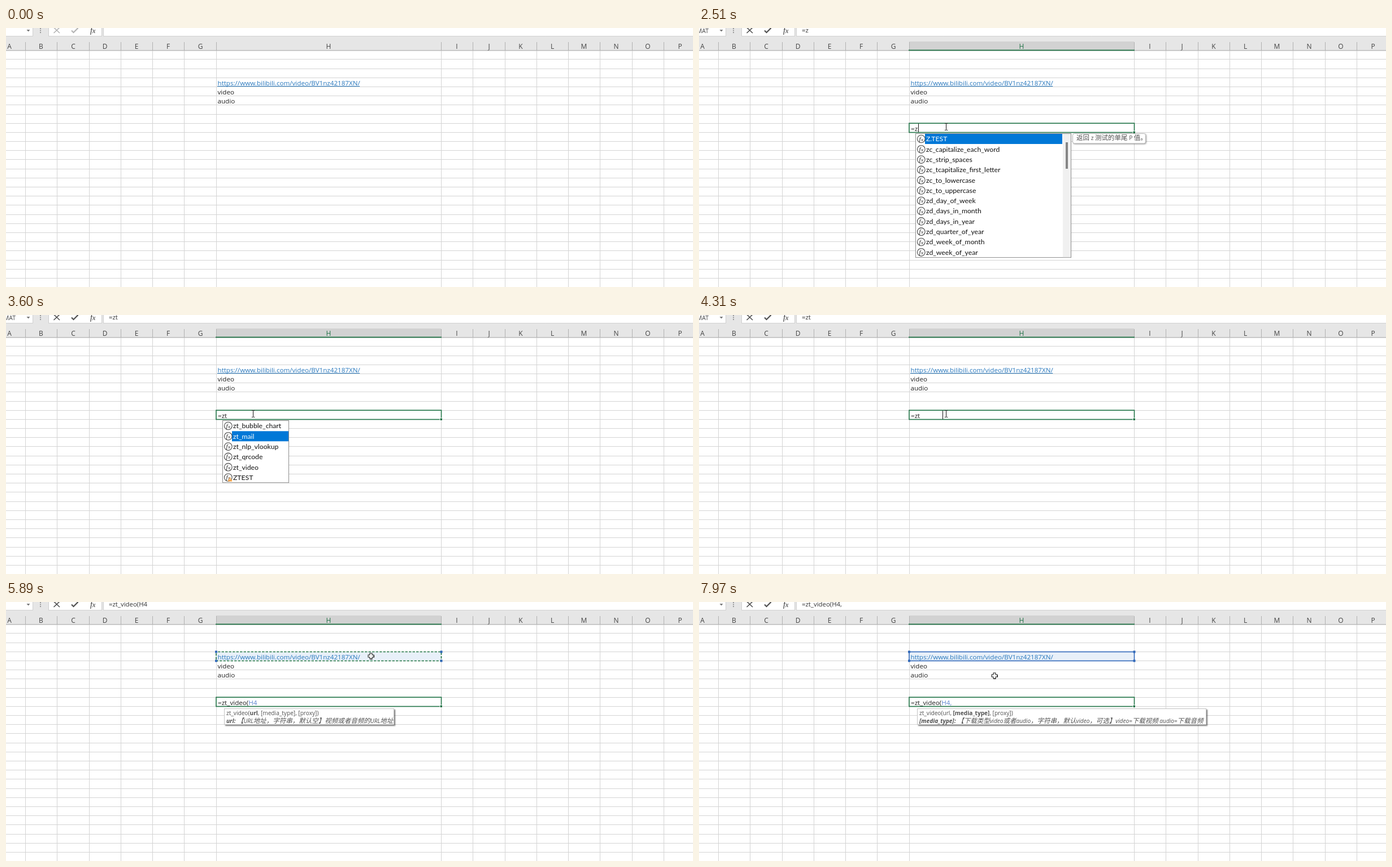
Write an HTML page with a canvas that moves like this. It is 1216 by 460 pixels and loops after 8000 ms.

```html
<!DOCTYPE html>
<html lang="zh">
<head>
<meta charset="utf-8">
<style>
html, body { margin: 0; width: 100%; height: 100%; overflow: hidden; background: #fff; }
canvas { display: block; }
</style>
</head>
<body>
<canvas id="stage" width="1216" height="460"></canvas>
<script>
const ctx = document.getElementById('stage').getContext('2d');
const LOOP = 8000, GREEN = '#217346', BLUE = '#2f67b8';
const SANS = '"Open Sans", "Noto Sans", sans-serif';
const CJK = '"Noto Sans CJK SC", "Noto Sans CJK", sans-serif';
const CELL_FONT = `11.64px ${SANS}`;
const LINK = 'https://www.bilibili.com/video/BV1nz42187XN/';
const LEFT = 372, RIGHT = 770, COLUMN = 56.25;
const rowY = n => Math.round(39.2 + 16.19 * n);

const typed = [[0, ''], [2130, '='], [2380, '=z'], [2740, '=zt'], [4390, '=zt_video('],
  [5650, '=zt_video(H4'], [7040, '=zt_video(H4,']];
const zList = ['Z.TEST', 'zc_capitalize_each_word', 'zc_strip_spaces', 'zc_tcapitalize_first_letter',
  'zc_to_lowercase', 'zc_to_uppercase', 'zd_day_of_week', 'zd_days_in_month', 'zd_days_in_year',
  'zd_quarter_of_year', 'zd_week_of_month', 'zd_week_of_year'];
const ztList = ['zt_bubble_chart', 'zt_mail', 'zt_nlp_vlookup', 'zt_qrcode', 'zt_video', 'ZTEST'];
const ztPick = [[0, 0], [3600, 1], [3680, 2], [3840, 3], [3920, 4]];
const caretShown = [[0, 0], [2130, 1], [3250, 0], [3760, 1], [4900, 0], [5420, 1], [5650, 0],
  [6340, 1], [6880, 0], [7040, 1], [7530, 0]];
const path = [[120, 1097, 454], [830, 445, 179], [1070, 444, 179], [1200, 444, 179], [1290, 436, 175],
  [1420, 437, 175], [4600, 437, 175], [5420, 578, 97], [5580, 646, 96], [7680, 646, 96], [7970, 523, 131]];

const within = (t, a, b) => t >= a && t < b;
const valueAt = (steps, t) => steps.reduce((v, s) => t >= s[0] ? s[1] : v, steps[0][1]);

function pointerAt(t) {
  const i = path.findIndex(p => p[0] > t);
  if (i < 0) return path[path.length - 1].slice(1);
  const [t0, x0, y0] = path[i - 1], [t1, x1, y1] = path[i];
  const u = (t - t0) / (t1 - t0), e = u * u * (3 - 2 * u);
  return [Math.round(x0 + (x1 - x0) * e), Math.round(y0 + (y1 - y0) * e)];
}

function fill(color, x, y, w, h) {
  ctx.fillStyle = color;
  ctx.fillRect(x, y, w, h);
}

function stroke(color, width, ...points) {
  ctx.strokeStyle = color;
  ctx.lineWidth = width;
  ctx.beginPath();
  points.forEach(([x, y]) => ctx.lineTo(x, y));
  ctx.stroke();
}

function outline(color, width, x, y, w, h) {
  ctx.strokeStyle = color;
  ctx.lineWidth = width;
  ctx.strokeRect(x, y, w, h);
}

function text(str, x, y, color, font = CELL_FONT, align = 'left') {
  ctx.font = font;
  ctx.fillStyle = color;
  ctx.textAlign = align;
  ctx.fillText(str, x, y);
  return ctx.measureText(str).width;
}

// Draws [style, string] parts; Latin runs are set slightly smaller than Chinese ones.
function rich(parts, x, y) {
  for (const [style, str] of parts)
    for (const run of str.match(/[\u3000-\uffef]+|[^\u3000-\uffef]+/g)) {
      const font = run[0] >= '\u3000' ? `11.5px ${CJK}` : `10.15px ${SANS}`;
      x += text(run, x, y, '#505050', `${style} ${font}`);
    }
}

function shadowed(blur, offset, draw) {
  ctx.save();
  Object.assign(ctx, { shadowColor: 'rgba(0,0,0,.5)', shadowBlur: blur, shadowOffsetX: offset, shadowOffsetY: offset });
  draw();
  ctx.restore();
}

function drawBar(t, formula) {
  const icon = formula ? '#505050' : '#b4b4b4';
  fill('#e6e6e6', 0, 0, 1216, 40);
  fill('#fff', 0, 0, 47, 14);
  fill('#fff', 76, 0, 94, 14);
  fill('#fff', 173, 0, 1043, 14);
  for (const [a, b] of [[0, 47], [76, 170], [173, 1216]]) stroke('#d0d0d0', 1, [a, 14.5], [b, 14.5]);
  for (const x of [47.5, 75.5, 169.5, 172.5]) stroke('#d0d0d0', 1, [x, 0], [x, 15]);
  ctx.fillStyle = '#777';
  ctx.beginPath();
  ctx.moveTo(36.5, 3); ctx.lineTo(42.5, 3); ctx.lineTo(39.5, 6.5);
  ctx.fill();
  for (const y of [0, 3.5, 7]) fill('#999', 60, y, 2, 2);
  stroke(icon, 1.6, [84.5, -1], [95, 9]);
  stroke(icon, 1.6, [95, -1], [84.5, 9]);
  stroke(icon, 2.2, [116, 4.5], [119.5, 8], [127.5, 0]);
  text('f', 149, 8.5, '#333', 'italic 14px "Liberation Serif", serif');
  text('x', 153, 8.5, '#333', 'italic 12px "Liberation Serif", serif');
  if (within(t, 2380, 5650)) text('MAT', 17, 8.5, '#444', `10.5px ${SANS}`, 'right');
  text(formula, 182, 7.8, '#333', `11.4px ${SANS}`);
}

function drawSheet(active) {
  const columns = [];
  for (let k = 0; k < 7; k++) columns.push(Math.round(34 + COLUMN * k));
  for (let k = 0; k < 8; k++) columns.push(Math.round(RIGHT + COLUMN * k));
  if (active) fill('#d2d2d2', LEFT, 24, RIGHT - LEFT, 16);
  columns.forEach((x, i) => {
    stroke('#b1b1b1', 1, [x + .5, 25], [x + .5, 40]);
    stroke('#d4d4d4', 1, [x + .5, 41], [x + .5, 460]);
    const center = i === 7 ? 571 : x - 28;
    text(String.fromCharCode(65 + i), center, 37.3, active && i === 7 ? GREEN : '#444', `12px ${SANS}`, 'center');
  });
  text('P', 1193, 37.3, '#444', `12px ${SANS}`, 'center');
  for (let n = 1; n < 27; n++) stroke('#d4d4d4', 1, [0, rowY(n) + .5], [1216, rowY(n) + .5]);
  stroke('#9f9f9f', 1, [0, 40], [1216, 40]);
  if (active) fill(GREEN, 371, 38.6, 400, 1.8);
}

function drawReference(t) {
  const chosen = t >= 5650;
  if (chosen) fill('#e8f0f9', LEFT, 88, 399, 16);
  const width = text(LINK, 374.5, 102, '#2878bd');
  if (!chosen) fill('#2878bd', 374, 103, width, 1);
  text('video', 374.5, 118, '#222');
  text('audio', 374.5, 134.3, '#222');
  if (!chosen) return;
  if (t < 7040) {
    outline('#fff', 1.7, LEFT, 88.5, 398.5, 16);
    ctx.setLineDash([4.5, 2]);
    ctx.lineDashOffset = -Math.floor(t / 80) * 2;
    outline(GREEN, 1.7, LEFT, 88.5, 398.5, 16);
    ctx.setLineDash([]);
  } else {
    outline(BLUE, 1.6, LEFT, 88.5, 398.5, 16);
  }
  for (const x of [LEFT, 770.5]) for (const y of [88.5, 104.5]) fill(BLUE, x - 2, y - 2, 4, 4);
}

function drawSelection(t) {
  const top = rowY(t < 1360 ? 17 : 8);
  fill('#fff', LEFT, top, 399, 17);
  outline(GREEN, 1.6, LEFT, top + .2, 398.5, 16.3);
  fill('#fff', 767.5, top + 13.5, 5, 5);
  fill(GREEN, 768.5, top + 14.5, 3.5, 3.5);
}

function drawEditor(t, formula) {
  const [head] = formula.split('H4');
  let x = 375;
  x += text(head, x, 183, '#222');
  x += text(formula.slice(head.length), x, 183, '#5b82cf');
  if (within(t, 4310, 4390)) x = 430;
  if (valueAt(caretShown, t)) fill('#111', Math.round(x) + 1, 170, 1, 15);
}

function drawFxIcon(y, warning) {
  ctx.strokeStyle = '#444';
  ctx.lineWidth = 1.1;
  ctx.beginPath();
  ctx.arc(393.3, y, 6.8, 0, 7);
  ctx.stroke();
  text('f', 389.5, y + 3.5, '#222', 'italic 11px "Liberation Serif", serif');
  text('x', 393, y + 3.5, '#222', 'italic 9px "Liberation Serif", serif');
  if (!warning) return;
  ctx.fillStyle = '#f09a3a';
  ctx.beginPath();
  ctx.moveTo(396.5, y - 1); ctx.lineTo(400.5, y + 7); ctx.lineTo(392.5, y + 7);
  ctx.fill();
  fill('#fff', 396, y + 2, 1, 3);
}

function drawList(items, picked, width, scrollable) {
  const height = items.length * 18.3 + 1.5;
  fill('#fff', 383, 187, width, height);
  outline('#8c8c8c', 1, 383.5, 187.5, width - 1, height - 1);
  if (scrollable) {
    fill('#f0f0f0', 644, 188, 14, height - 2);
    fill('#858585', 649, 203, 4, 47);
  }
  items.forEach((item, i) => {
    const y = 197 + 18.3 * i;
    if (i === picked) fill('#0078d7', 400, y - 9, scrollable ? 243 : 100, 18);
    drawFxIcon(y, item === 'ZTEST');
    text(item, 402, y + 4.3, i === picked ? '#fff' : '#111', '12.2px Lato, sans-serif');
  });
}

function drawHint(x, y, width, lines) {
  shadowed(3, 1, () => {
    ctx.fillStyle = '#fff';
    ctx.beginPath();
    ctx.roundRect(x + .5, y + .5, width - 1, 4 + 13.5 * lines.length, 3);
    ctx.fill();
  });
  ctx.strokeStyle = '#b5b5b5';
  ctx.lineWidth = 1;
  ctx.stroke();
  lines.forEach((line, i) => rich([['', line]], x + 7, y + 12 + 13 * i));
}

function drawSuggestions(t) {
  if (within(t, 2430, 2740)) {
    drawList(zList, 0, 276, true);
    if (t >= 2510) drawHint(661, 187, 130, ['返回 z 测试的单尾 P 值。']);
  } else if (within(t, 2740, 4230)) {
    drawList(ztList, valueAt(ztPick, t), 118, false);
    if (within(t, 2900, 3600))
      drawHint(504, 187, 538, ['根据表格区域中的数据生成气泡图，可以设置标题、坐标轴、颜色和大小，返回图表文件的保存路径']);
    if (t >= 4000) drawHint(504, 260, 184, ['根据视频的URL地址下载视频', '或者音频文件']);
  }
}

function drawSignature(t) {
  if (t < 4390) return;
  const second = t >= 7040, width = second ? 512 : 301;
  shadowed(2, 2, () => fill('#fff', 386, 189, width, 29));
  outline('#c4c4c4', 1, 386.5, 189.5, width - 1, 28);
  rich([['', 'zt_video('], [second ? '' : 'bold', 'url'], ['', ', '],
    [second ? 'bold' : '', '[media_type]'], ['', ', [proxy])']], 390, 200.5);
  rich(second
    ? [['italic bold', '[media_type]: '], ['italic', '【下载类型video或者audio，字符串，默认video，可选】video=下载视频 audio=下载音频']]
    : [['italic bold', 'url: '], ['italic', '【URL地址，字符串，默认空】视频或者音频的URL地址']], 390, 214.5);
}

function drawPointer(t) {
  if (t < path[0][0]) return;
  const [x, y] = pointerAt(t);
  if (within(t, 1280, 1420) || within(t, 5650, 5810)) {
    ctx.fillStyle = '#fdf44e';
    ctx.beginPath();
    ctx.arc(x, y, 10.5, 0, 7);
    ctx.fill();
  }
  if (t >= 2130 && y > 168 && y < 186) {
    fill('#111', x, y - 5, 1, 11);
    for (const end of [y - 6, y + 6]) {
      fill('#111', x - 2, end, 2, 1);
      fill('#111', x + 1, end, 2, 1);
    }
    return;
  }
  const cross = (color, arm, half) => {
    fill(color, x - arm, y - half, 2 * arm, 2 * half);
    fill(color, x - half, y - arm, 2 * half, 2 * arm);
  };
  cross('#111', 5.5, 2.5);
  fill('#111', x - 1.5, y + 5, 4, 1);
  fill('#111', x + 5, y - 1.5, 1, 4);
  cross('#fff', 4.5, 1.5);
}

function frame() {
  const t = performance.now() % LOOP;
  const formula = valueAt(typed, t), active = t >= 120;
  fill('#fff', 0, 0, 1216, 460);
  drawBar(t, formula);
  drawSheet(active);
  drawReference(t);
  if (active) drawSelection(t);
  if (formula) drawEditor(t, formula);
  drawSuggestions(t);
  drawSignature(t);
  drawPointer(t);
  requestAnimationFrame(frame);
}
frame();
</script>
</body>
</html>
```
